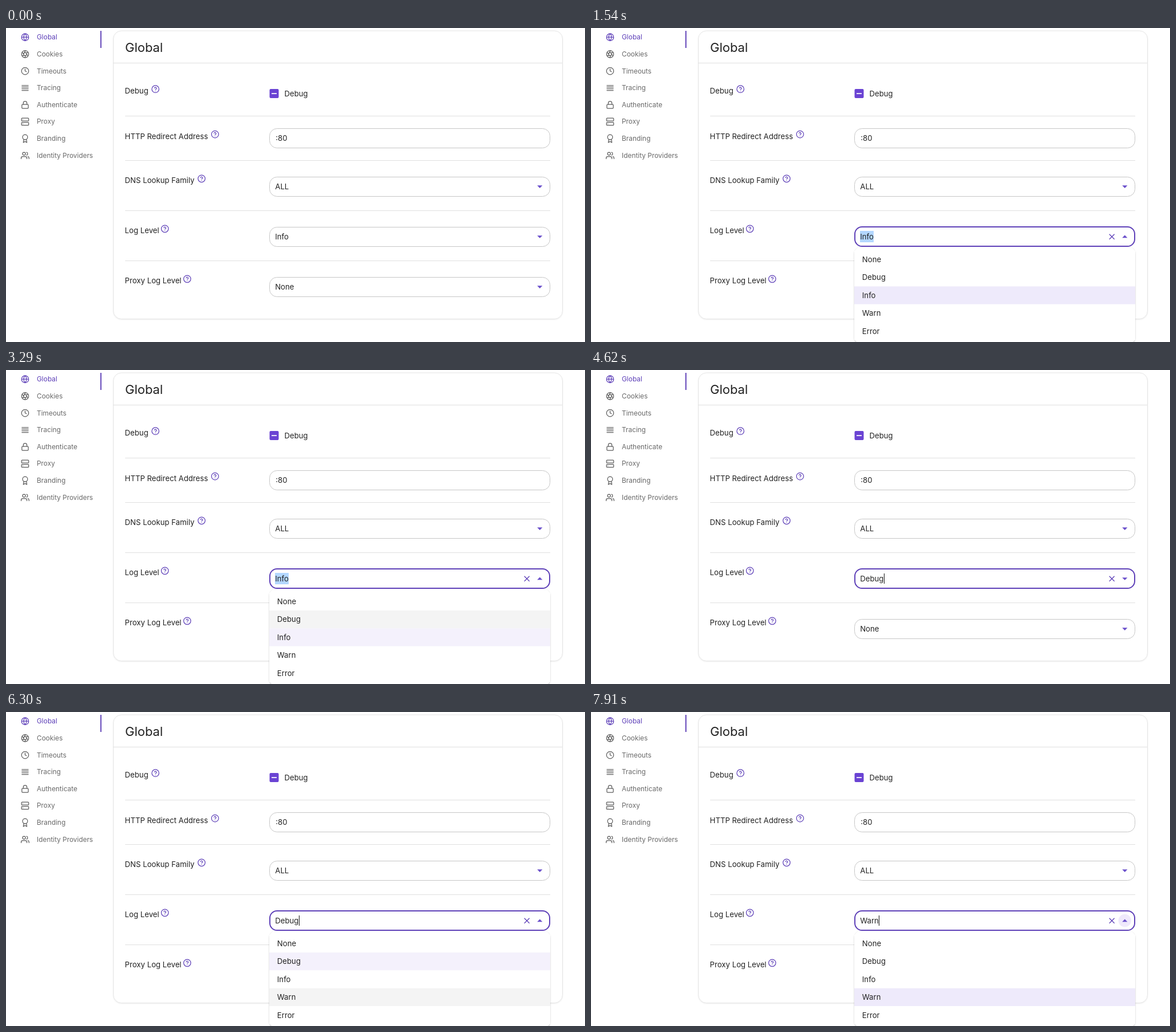
These frames come from a looping animation (1016x551 px, 8 s). An HTML page:

```html
<!DOCTYPE html>
<html lang="en">
<head>
<meta charset="utf-8">
<title>Global settings</title>
<style>
  html, body { margin: 0; width: 100%; height: 100%; overflow: hidden; background: #fff; }
  svg { display: block; }
  text { font: 13.2px Inter, "Open Sans", sans-serif; fill: #222; }
  .title { font-size: 22px; }
  .nav text { font-size: 11.9px; fill: #6a6a6a; }
  .nav .active text { fill: #5e40b8; }
  .icon { fill: none; stroke: #5c5c5c; stroke-width: 2; stroke-linecap: round; stroke-linejoin: round; }
  .help, .nav .active .icon { stroke: #5e40b8; }
  .rule { stroke: #e0e0e0; }
  .card { fill: #fff; stroke: #e5e5e5; filter: drop-shadow(0 1px 1px rgba(0,0,0,.07)); }
  .box { fill: #fff; stroke: #c6c6c6; }
  .box.hover { stroke: #222; }
  .box.focus { stroke: #5e40b8; stroke-width: 2; }
  .arrow { fill: #6a4fcb; }
  .clear { stroke: #5e40b8; stroke-width: 1.3; }
  .paper { fill: #fff; filter: drop-shadow(0 1px 1.2px rgba(0,0,0,.24)); }
</style>
</head>
<body>
<svg id="stage" width="1016" height="551" viewBox="0 0 1016 551"></svg>
<script>
const stage = document.getElementById('stage');
const LEVELS = ['None', 'Debug', 'Info', 'Warn', 'Error'];
const ROW = 31.4, LIST_TOP = 390.6;

function add(parent, tag, attrs = {}, content = '') {
  const node = document.createElementNS('http://www.w3.org/2000/svg', tag);
  for (const key in attrs) node.setAttribute(key, attrs[key]);
  node.textContent = content;
  return parent.appendChild(node);
}
const group = (parent, cls = '') => add(parent, 'g', { class: cls });
const label = (parent, x, y, content, cls = '') => add(parent, 'text', { x, y, class: cls }, content);
const rect = (parent, x, y, width, height, attrs) => add(parent, 'rect', { x, y, width, height, ...attrs });
const circle = (cx, cy, r) => `M${cx - r} ${cy}a${r} ${r} 0 1 0 ${2 * r} 0a${r} ${r} 0 1 0 ${-2 * r} 0`;
const icon = (parent, cx, cy, d, cls = '') => add(parent, 'path', {
  d, class: 'icon ' + cls, transform: `translate(${cx} ${cy}) scale(.625) translate(-12 -12)`
});
const rule = (x1, x2, y) => add(stage, 'path', { d: `M${x1} ${y}H${x2}`, class: 'rule' });
const box = (y, parent = stage) => rect(parent, 462.5, y, 492, 34, { rx: 13, class: 'box' });
const arrow = (parent, cy) => add(parent, 'path', { d: `M932.1 ${cy - 2}h9.2l-4.6 4.6z`, class: 'arrow' });
const cross = (parent, cy) => add(parent, 'path', { d: `M909.5 ${cy - 4.5}l9 9m0-9l-9 9`, class: 'clear' });
const show = (node, on) => node.setAttribute('visibility', on ? 'visible' : 'hidden');

// Sidebar
const nav = group(stage, 'nav');
const globe = circle(12, 12, 10) + 'M2 12h20M12 2a15.3 15.3 0 0 1 4 10 15.3 15.3 0 0 1-4 10 15.3 15.3 0 0 1-4-10 15.3 15.3 0 0 1 4-10z';
[
  ['Global', globe],
  ['Cookies', circle(12, 12, 10) + 'M14.3 8l5.7 9.9M9.7 8h11.5M7.4 12l5.7-9.9M9.7 16L4 6.1M14.3 16H2.8M16.6 12l-5.7 9.9'],
  ['Timeouts', circle(12, 12, 10) + 'M12 6v6l4 2'],
  ['Tracing', 'M3 5h18M3 9.7h18M3 14.3h18M3 19h18'],
  ['Authenticate', 'M5 11h14a2 2 0 0 1 2 2v7a2 2 0 0 1-2 2H5a2 2 0 0 1-2-2v-7a2 2 0 0 1 2-2zM7 11V7a5 5 0 0 1 10 0v4'],
  ['Proxy', 'M4 2h16a2 2 0 0 1 2 2v4a2 2 0 0 1-2 2H4a2 2 0 0 1-2-2V4a2 2 0 0 1 2-2zm0 12h16a2 2 0 0 1 2 2v4a2 2 0 0 1-2 2H4a2 2 0 0 1-2-2v-4a2 2 0 0 1 2-2zM6 6h.01M6 18h.01'],
  ['Branding', circle(12, 8, 7) + 'M8.2 13.9L7 23l5-3 5 3-1.2-9.1'],
  ['Identity Providers', circle(9, 7, 4) + 'M17 21v-2a4 4 0 0 0-4-4H5a4 4 0 0 0-4 4v2M23 21v-2a4 4 0 0 0-3-3.9M16 3.1a4 4 0 0 1 0 7.8']
].forEach(([name, path], i) => {
  const item = group(nav, i ? '' : 'active'), y = 16.2 + i * 29.65;
  icon(item, 33.5, y, path);
  label(item, 54, y + 4, name);
});
rect(stage, 165.5, 5, 2, 30, { fill: '#5e40b8' });

// Card and form rows
rect(stage, 188.5, 5, 788, 505.5, { rx: 14, class: 'card' });
label(stage, 209, 41.5, 'Global', 'title');
rule(188, 976, 61.5);
[154.5, 232.5, 320.5, 408.5].forEach(y => rule(209, 955, y));
const question = circle(12, 12, 10) + 'M9.1 9a3 3 0 0 1 5.8 1c0 2-3 3-3 3M12 17h.01';
[
  ['Debug', 115.2, 262.2],
  ['HTTP Redirect Address', 194.5, 366.8],
  ['DNS Lookup Family', 272.3, 343.2],
  ['Log Level', 360.3, 278.8],
  ['Proxy Log Level', 448.3, 318]
].forEach(([name, y, helpX]) => {
  label(stage, 208.6, y, name);
  icon(stage, helpX, y - 8, question, 'help');
});

rect(stage, 462.5, 107, 16, 16, { rx: 2, fill: '#6a43d3' });
rect(stage, 466, 114.2, 9, 1.7, { fill: '#fff' });
label(stage, 488.5, 119.8, 'Debug');
box(176.5);
label(stage, 473.3, 198.4, ':80');
box(261.5);
label(stage, 472.3, 283, 'ALL');
arrow(stage, 278.3);

const proxyBox = box(437.5);
label(stage, 472.2, 459, 'None');
const proxyClear = cross(stage, 454.3);
arrow(stage, 454.3);

// Log level field
const idleBox = box(349.5);
const focused = group(stage);
rect(focused, 463, 349, 491, 34, { rx: 12.5, class: 'box focus' });
cross(focused, 366.2);
const selection = rect(stage, 472, 356, 24, 20, { fill: '#b3d7ff' });
const value = label(stage, 472.2, 371);
const halo = add(stage, 'circle', { cx: 936.7, cy: 366, r: 11.2, fill: '#efe9fb' });
const toggle = arrow(stage, 366.2);
const caret = rect(stage, 514, 357, 1, 18, { fill: '#111' });

// Option list
const popup = group(stage);
rect(popup, 462, 384.5, 493, 169, { rx: 11, class: 'paper' });
rect(popup, 462, 384, 493, .8, { fill: '#fff' });
const rows = LEVELS.map((name, i) => {
  const y = LIST_TOP + i * ROW;
  const row = rect(popup, 462, y, 493, ROW);
  label(popup, 475.8, y + 20.3, name);
  return row;
});
// The focused outline stays above the list's top edge.
popup.after(focused, selection, value, halo, toggle, caret);

// Each track lists [start ms, value]; hard changes only.
const tracks = {
  focus: [[0, 0], [1050, 1]],
  value: [[0, 'Info'], [4200, 'Debug'], [6580, 'Warn']],
  open: [[0, 0], [1540, 1], [1750, 0], [2380, 1], [4200, 0], [5320, 1], [6580, 0], [7770, 1]],
  halo: [[0, 0], [1050, 1], [1540, 0], [1680, 1], [2100, 0], [2310, 1], [2660, 0],
    [5250, 1], [5320, 0], [5390, 1], [5530, 0], [7700, 1]],
  hover: [[0, ''], [2940, 'None'], [3290, 'Debug'], [4200, ''],
    [5670, 'None'], [5740, 'Debug'], [5880, 'Info'], [6020, 'Warn'], [6580, '']],
  caret: [[0, 0], [4200, 1], [4760, 0], [5250, 1], [5810, 0], [6300, 1], [6580, 1], [7140, 0], [7700, 1]],
  proxyHover: [[0, 0], [4200, 1], [4620, 0]],
  proxyClear: [[0, 0], [4200, 1], [4620, 0], [6930, 1], [7000, 0]]
};
const at = (name, t) => tracks[name].findLast(([start]) => start <= t)[1];

function rowColor(name, selected, hovered) {
  if (name === selected) return !hovered || hovered === name ? '#eeeafb' : '#f4f1fc';
  return name === hovered ? '#f4f4f4' : '#fff';
}

function draw(now) {
  const t = now % 8000, focus = at('focus', t), open = at('open', t);
  const level = at('value', t), hovered = at('hover', t);
  show(idleBox, !focus);
  show(focused, focus);
  show(selection, focus && level === 'Info');
  value.textContent = level;
  show(halo, at('halo', t));
  toggle.setAttribute('transform', open ? 'rotate(180 936.7 366.2)' : '');
  show(caret, at('caret', t));
  caret.setAttribute('x', level === 'Warn' ? 505 : 514);
  show(popup, open);
  rows.forEach((row, i) => row.setAttribute('fill', rowColor(LEVELS[i], level, hovered)));
  proxyBox.classList.toggle('hover', !!at('proxyHover', t));
  show(proxyClear, at('proxyClear', t));
}

const begin = performance.now();
function tick() {
  draw(performance.now() - begin);
  requestAnimationFrame(tick);
}
tick();
</script>
</body>
</html>
```
